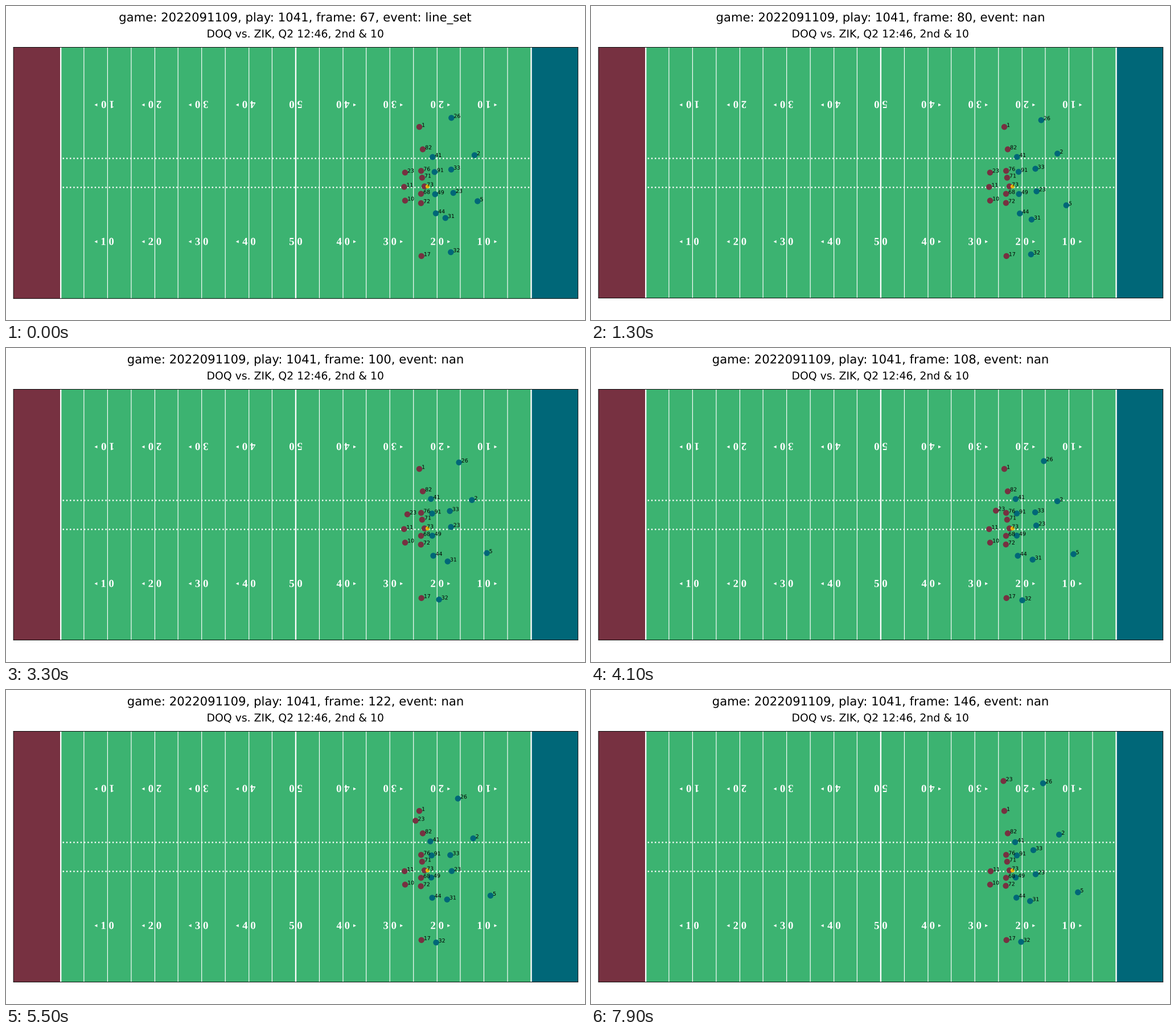
Animation of 1017 by 551 pixels, one loop 8000 ms. Source, as a matplotlib script:

```python
from math import floor

import numpy as np
import matplotlib.pyplot as plt
from matplotlib.animation import FuncAnimation
from matplotlib.patches import Circle, PathPatch, Polygon, Rectangle
from matplotlib.textpath import TextPath
from matplotlib.transforms import Affine2D

W, H, DPI = 1017, 551, 84.75
FRAMES, INTERVAL = 80, 100
POINT = DPI / 72
AWAY, HOME, GRASS, BALL = "#773141", "#006778", "mediumseagreen", "#e8b40c"
CENTER, WIDTH = 53.3 / 2, 53.3

FIRST_NUMBER = 67
EVENTS = {0: "line_set", 72: "shift"}

# Each path is a few points, evenly spaced in time; one point means standing still.
OFFENSE = {
    1: [(726, 212.2)],
    82: [(732, 251.5)],
    76: [(729.2, 289.3)],
    71: [(730.9, 301.3)],
    73: [(735, 316.5)],
    68: [(729, 329.6)],
    72: [(729, 346), (728.6, 343.6)],
    17: [(729.7, 438.8)],
    10: [(701, 341.5)],
    11: [(699.3, 317.4), (699.3, 317.8), (702, 318)],
}
DEFENSE = {
    26: [(782.3, 196.3), (794, 201.5), (795.5, 199), (793.5, 187), (794, 163.7)],
    2: [(823, 261.8), (818, 259), (819, 269), (821, 258), (822.2, 253.8)],
    33: [(782, 287), (779.5, 285), (780.5, 290), (777, 281)],
    23: [(785.7, 328), (781.5, 323), (782, 311.5), (783, 319.5), (781, 323.3)],
    31: [(771.8, 372), (775.5, 376), (775, 367.8), (771.2, 370.4)],
    5: [(828.3, 342.5), (847, 361.5), (855.3, 355)],
    32: [(781.3, 432), (758, 442.5), (755.5, 442)],
    41: [(749.3, 265), (746, 265), (745, 267)],
    91: [(752.8, 291.3), (748, 290.4), (748, 290.3)],
    49: [(753.7, 330.3), (748, 329.3), (746, 329)],
    44: [(755, 363.8), (749.8, 364.6), (747.2, 364.4)],
}
# The man in motion waits, then runs along the line.
RUNNER, RUN_START = 23, 28
RUN = [(700.9, 292.3), (711, 286), (719, 236), (719.2, 179), (724.5, 159.7)]


def glide(points, start=0):
    """Catmull-Rom curve through the points, one position per frame."""
    p = np.array(points * 2 if len(points) == 1 else points, float)
    m = np.gradient(p, axis=0)
    t = np.clip((np.arange(FRAMES) - start) / (FRAMES - 1 - start), 0, 1)
    s = t * (len(p) - 1)
    k = np.minimum(s.astype(int), len(p) - 2)
    u = (s - k)[:, None]
    return ((1 + 2 * u) * (1 - u) ** 2 * p[k] + u * (1 - u) ** 2 * m[k]
            + u * u * (3 - 2 * u) * p[k + 1] + u * u * (u - 1) * m[k + 1])


# Field lines lie on whole cells of a 1200 by 650 grid scaled to the stage.
def yard_x(yard):
    return (floor(15.5 + 9.75 * yard) + 0.5) * W / 1200


def yard_y(yard, nudge=0.0):
    return H - (floor(45.1 - nudge + 9.75 * yard) + 0.5) * H / 650


def lettering(text, size, x, y, centered=True, turn=1, **font):
    """Outline of a text with its baseline at y; turn=-1 sets it upside down."""
    path = TextPath((0, 0), text, size=size * POINT, prop=font)
    box = path.get_extents()
    dx = -(box.x0 + box.x1) / 2 if centered else 0
    place = Affine2D().translate(dx, 0).scale(turn, -turn).translate(x, y)
    return place.transform_path(path)


plt.rcParams["path.snap"] = False
fig = plt.figure(figsize=(W / DPI, H / DPI), dpi=DPI, facecolor="white")
ax = fig.add_axes([0, 0, 1, 1])
ax.set_xlim(0, W)
ax.set_ylim(H, 0)
ax.axis("off")

TOP = yard_y(WIDTH)
strips, rows, actors = [], [], []


def add(patch):
    patch.set_linewidth(0)
    return ax.add_patch(patch)


def strip(x0, x1, color):
    strips.append(add(Rectangle((x0, TOP), x1 - x0, 1, color=color)))


def upright(yard, points, color):
    x, half = yard_x(yard), points * POINT / 2
    strip(x - half, x + half, color)


def row(yard, x0, x1, **style):
    line, = ax.plot([x0, x1], [0, 0], zorder=1, **style)
    rows.append((line, yard))


def yard_number(yard):
    x, side = yard_x(yard), np.sign(yard - 60)
    digits = f"{5 - abs(yard - 60) // 10} 0"
    for base, middle, turn in ((419.3, 413.5, 1), (166.7, 173.5, -1)):
        path = lettering(digits, 16, x, base, turn=turn,
                         family="Liberation Serif", weight="bold")
        add(PathPatch(path, color="white"))
        if side:
            tip, back = x + side * 23, x + side * 18
            add(Polygon([(tip, middle), (back, middle - 2.6),
                         (back, middle + 2.6)], color="white"))


def draw_field():
    for start, end, color in ((0, 10, AWAY), (10, 110, GRASS), (110, 120, HOME)):
        strip(yard_x(start), yard_x(end), color)
    for yard in range(10, 111, 5):
        upright(yard, 2 if yard in (10, 60, 110) else 1, "white")
    for side in (-1, 1):
        row(CENTER + side * 3.08, yard_x(10.5), yard_x(110),
            color="white", lw=2, ls=":")
    for yard in range(20, 101, 10):
        yard_number(yard)
    for yard in (0, 120):
        upright(yard, 0.8, "black")
    for yard in (0, WIDTH):
        row(yard, yard_x(0), yard_x(120), color="black", lw=0.8)


def add_actor(track, color, radius, zorder, number=None):
    spot = Affine2D()
    move = spot + ax.transData
    add(Circle((0, 0), radius, color=color, transform=move, zorder=zorder))
    if number is not None:
        label = lettering(str(number), 8, 4.1, 0, centered=False,
                          family="DejaVu Sans")
        add(PathPatch(label, color="black", transform=move, zorder=6))
    actors.append((spot, track))


def headline(text):
    return lettering(text, 18, 508.2, 27.1, family="DejaVu Sans")


draw_field()
for team, color in ((OFFENSE, AWAY), (DEFENSE, HOME)):
    for number, points in team.items():
        add_actor(glide(points), color, 5.2, 4, number)
add_actor(glide(RUN, RUN_START), AWAY, 5.2, 4, RUNNER)
add_actor(glide([(740.3, 316.7)]), BALL, 3.5, 5)

title = add(PathPatch(headline("game"), color="black"))
add(PathPatch(lettering("DOQ vs. ZIK, Q2 12:46, 2nd & 10", 16, 508.5, 55.2,
                        family="DejaVu Sans"), color="black"))


def update(i):
    event = EVENTS.get(i, "nan")
    title.set_path(headline(f"game: 2022091109, play: 1041, "
                            f"frame: {FIRST_NUMBER + i}, event: {event}"))
    # A title with an underscore hangs lower and pushes the field down a little.
    nudge = 0.25 if "_" in event else 0.0
    for line, yard in rows:
        line.set_ydata([yard_y(yard, nudge)] * 2)
    for patch in strips:
        patch.set_height(yard_y(0, nudge) - TOP)
    for spot, track in actors:
        spot.clear().translate(*track[i])
    return []


anim = FuncAnimation(fig, update, frames=FRAMES, interval=INTERVAL, repeat=True)
plt.show()
```
